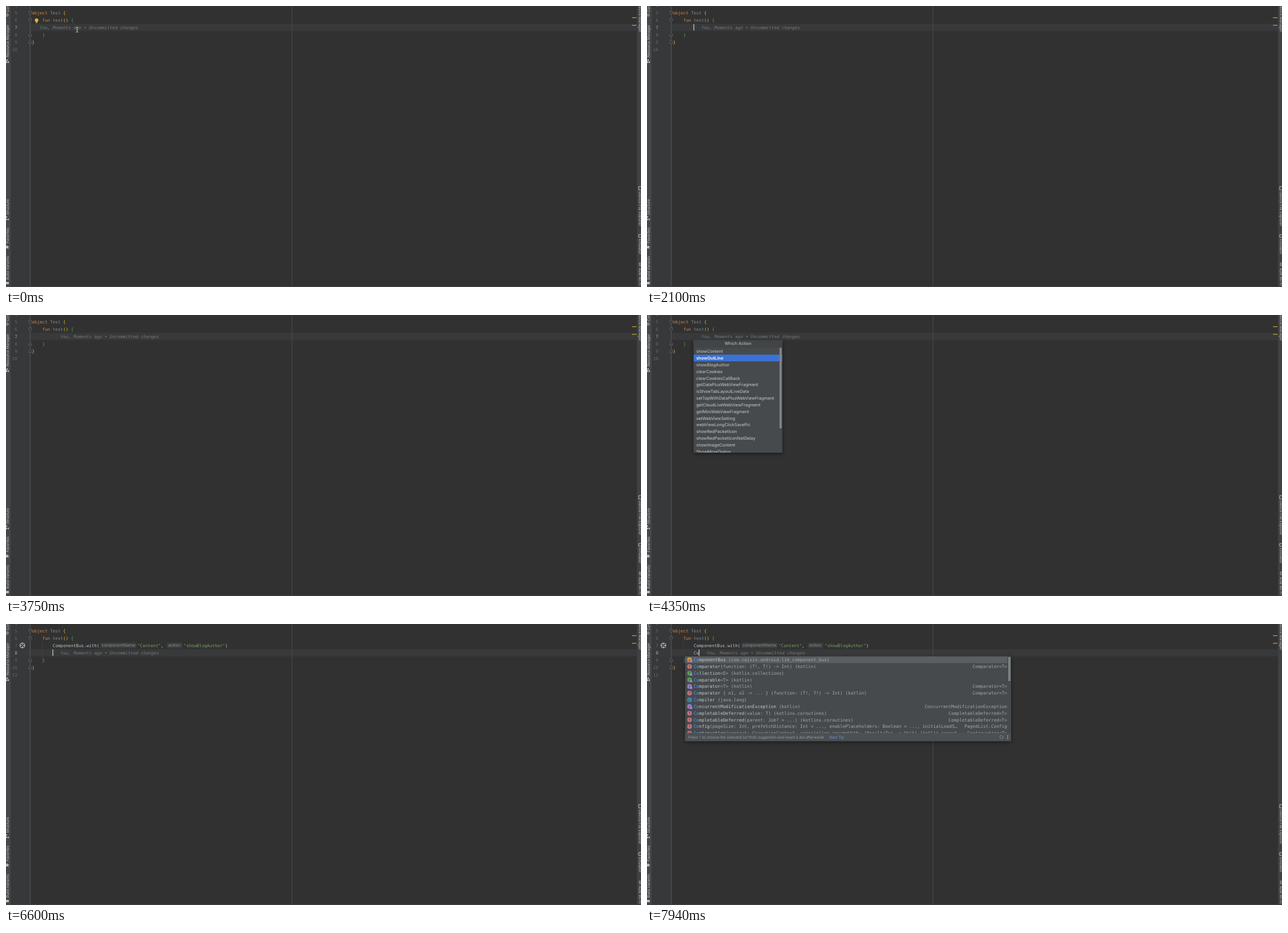
An HTML page for the animation above (8000 ms loop, 1125 px wide and 498 px high).

```html
<!DOCTYPE html>
<html lang="en">
<head>
<meta charset="utf-8">
<title>Editor completion</title>
<style>
html, body { margin: 0; width: 100%; height: 100%; overflow: hidden; background: #313131; }
svg { display: block; width: 100vw; height: 100vh; }
text { white-space: pre; text-rendering: geometricPrecision; }
.mono { font: 7.64px "DejaVu Sans Mono", monospace; }
.list { font: 7.84px "DejaVu Sans Mono", monospace; }
.ui { font: 7.55px Inter, sans-serif; }
.small { font: 6.49px Inter, sans-serif; }
.popup { filter: drop-shadow(0 2px 3px rgba(0, 0, 0, .45)); }
</style>
</head>
<body>
<svg id="stage" viewBox="0 0 1125 498" preserveAspectRatio="none"></svg>
<script>
const LOOP = 8000, CHAR = 4.6, LEFT = 46, ROW = 12.98, PITCH = 11.83;
const C = {
  text: '#bcc3cb', key: '#d28445', dim: '#85878a', str: '#78a160', yellow: '#e8ba36',
  green: '#54a857', panel: '#464a4c', ui: '#c9cbcc', note: '#787878', num: '#65686b'
};
const stage = document.getElementById('stage');
const timed = [];

function el(tag, attrs, parent = stage) {
  const node = document.createElementNS('http://www.w3.org/2000/svg', tag);
  for (const k in attrs) node.setAttribute(k, attrs[k]);
  return parent.appendChild(node);
}
const rect = (x, y, width, height, fill, parent, more) =>
  el('rect', { x, y, width, height, fill, ...more }, parent);
const path = (d, stroke, parent, more) =>
  el('path', { d, stroke, fill: 'none', 'stroke-width': 1, ...more }, parent);
function label(cls, x, y, str, fill, parent, more) {
  const t = el('text', { class: cls, x, y, fill, ...more }, parent);
  t.textContent = str;
  return t;
}
// parts alternate: text, colour, text, colour...
function rich(cls, x, y, parts, parent) {
  const t = el('text', { class: cls, x, y }, parent);
  for (let i = 0; i < parts.length; i += 2)
    el('tspan', { fill: parts[i + 1] }, t).textContent = parts[i];
}
function during(from, to, parent = stage) {
  const node = el('g', {}, parent);
  timed.push({ node, from, to });
  return node;
}
const base = n => 40.7 + (n - 7) * ROW;
const mid = n => 38 + (n - 7) * ROW;
const col = n => LEFT + n * CHAR;

// --- editor ground
rect(0, 0, 1125, 498, '#313131');
rect(8, 0, 35, 498, '#36383a');
const activeRow = rect(8, 31.5, 1110, 13, '#37393a');
rect(42.5, 0, 1, 498, '#5a5b5c');
rect(506.3, 0, 1, 498, '#4e4e4e');
rect(8, 496.8, 1110, 1.2, '#3f4244');
rect(0, 0, 8, 498, '#45484a');
rect(1118, 0, 7, 498, '#3f4244');

// --- tool window stripes
function side(x, y, angle, str) {
  label('small', 0, 0, str, '#bfc1c2', stage, { transform: `translate(${x} ${y}) rotate(${angle})` });
}
[['Commit', 11], ['Resource Manager', 91], ['Structure', 370.5], ['Favorites', 420.5], ['Build Variants', 485]]
  .forEach(([s, y]) => side(4.8, y, -90, s));
[['Device Manager', -4], ['Device File Explorer', 329], ['Emulator', 413], ['ADB Wi-Fi', 464]]
  .forEach(([s, y]) => side(1120.7, y, 90, s));
el('circle', { cx: 2, cy: 16, r: 2, fill: 'none', stroke: '#bfc1c2' });
el('path', { d: 'M2 94l2 3h-4zM0 98h2v3h-2zM3 98h2v3h-2z', fill: '#bfc1c2' });
el('path', { d: 'M0 373h2v2h-2zM0 377h2v2.500h-2zM3 377h2v2.500h-2z', fill: '#bfc1c2' });
el('path', { d: 'M2 423l1 3h3l-2.300 1.800 1 3-2.700-1.800-2.700 1.800 1-3-2.300-1.800h3z', fill: '#bfc1c2' });
el('path', { d: 'M0 489h5v4h-5z', fill: '#bfc1c2' });
path('M1121 320h5v6h-5z', '#bfc1c2');
path('M1121 405h5v5h-5z', '#bfc1c2');
path('M1121 456l4 4M1121 459l3 2M1122 455l4 2', '#bfc1c2');

// --- right-hand marks
rect(1109, 20, 8, 1.3, '#c2a126');
rect(1109, 33.6, 8, 1.3, '#c2a126');
rect(1109, 46.6, 8, 1.2, '#3f6a35', during(5250, 6450));

// --- line numbers
const number = (n, fill, parent) =>
  label('mono', 20, base(n), n, fill, parent, { 'text-anchor': 'end' });
[4, 5, 6, 9, 10].forEach(n => number(n, C.num));
number(7, '#a9abad', during(0, 6450));
number(8, C.num, during(0, 6450));
const added = during(6450, LOOP);
number(7, C.num, added);
number(8, '#a9abad', added);
number(11, C.num, added);
rect(64, 31.5, 1, 39, '#3d3e3f', added);

// --- fold handles
function fold(n, open, parent) {
  const y = mid(n), s = open ? 1 : -1;
  path(`M40.500 ${y - 2.5 * s}h5v${3.5 * s}l-2.500 ${2 * s}l-2.500 ${-2 * s}z`, '#66696b', parent,
    { fill: '#313131', 'stroke-width': .8 });
  path(`M42 ${y - .3 * s}h2`, '#66696b', parent, { 'stroke-width': .7 });
}
fold(5, true);
fold(6, true);

// --- code
rich('mono', LEFT, base(5), ['object ', C.key, 'Test ', C.dim, '{', C.yellow]);
rich('mono', col(4), base(6), ['fun ', C.key, 'test', C.dim, '()', C.yellow, ' {', C.green]);
function tail(n, parent) {
  fold(n, false, parent);
  fold(n + 1, false, parent);
  label('mono', col(4), base(n), '}', C.green, parent);
  label('mono', LEFT, base(n + 1), '}', C.yellow, parent);
}
tail(8, during(0, 6450));
tail(9, added);

rect(col(8), 32, 12 * CHAR, 12, '#344336', during(5250, 6600));
rich('mono', col(8), base(7), ['ComponentBus.with(', C.text], during(5250, LOOP));
rich('mono', col(26), base(7),
  ['"Content"', C.str, ', ', C.text, '"showBlogAuthor"', C.str, ')', C.text], during(5250, 5550));

const hinted = during(5550, LOOP);
function hint(x, w, str) {
  rect(x, 33, w, 10, '#3c3d3e', hinted, { rx: 2 });
  label('ui', x + 2.2, 40.4, str, '#8c8e90', hinted, { style: 'font-size:7.300px' });
}
hint(167, 64, 'componentName:');
hint(285, 27, 'action:');
rich('mono', 233, base(7), ['"Content"', C.str, ',', C.text], hinted);
rich('mono', 314.8, base(7), ['"showBlogAuthor"', C.str, ')', C.text], hinted);
el('circle', { cx: 29, cy: 38, r: 4.3, fill: 'none', stroke: '#c4c6c7', 'stroke-width': 1.1 }, hinted);
path('M29 34v2.600M29 39.400v2.600M25 38h2.600M30.400 38h2.600', '#c4c6c7', hinted, { 'stroke-width': 1.5 });

label('mono', col(8), base(8), 'C', C.text, during(7640, 7790));
label('mono', col(8), base(8), 'Co', C.text, during(7790, LOOP));

const note = label('mono', 0, 0, 'You, Moments ago • Uncommitted changes', C.note, stage,
  { style: 'font-style:italic' });
const caret = rect(0, 0, 1.2, 11.4, '#dcdcdc');

// --- bulb and text pointer
const idle = during(0, 450);
el('circle', { cx: 54.2, cy: 25.2, r: 3.1, fill: '#f2ac2b' }, idle);
rect(52.7, 28, 3, 1.1, '#e3a52e', idle);
rect(53, 29.6, 2.4, 1, '#a9abad', idle);
const beam = 'M123.500 37q2.500 0 2.500 1.500q0-1.500 2.500-1.500M126 38v7M123.500 46.500q2.500 0 2.500-1.500q0 1.500 2.500 1.500M124.800 42h2.400';
path(beam, '#1c1c1c', idle, { 'stroke-width': 2 });
path(beam, '#e4e4e4', idle, { 'stroke-width': .9 });

// --- chooser popups
function frame(x, y, w, h, parent) {
  const g = el('g', { class: 'popup' }, parent);
  rect(x, y, w, h, C.panel, g);
  return g;
}
function clip(id, x, y, width, height) {
  rect(x, y, width, height, '#000', el('clipPath', { id }));
  return `url(#${id})`;
}
function chooser(id, from, to, w, title, items, picks, thumb) {
  const root = during(from, to), x = 82.5;
  frame(x, 44.5, w, 199.5, root);
  rect(x, 44.5, w, 13.7, '#414547', root);
  label('ui', x + w / 2, 53.3, title, C.ui, root, { 'text-anchor': 'middle' });
  const body = el('g', { 'clip-path': clip(id, x, 58, w, 186) }, root);
  const line = (i, fill, parent, more) => label('ui', x + 4.7, 67.2 + i * PITCH, items[i], fill, parent, more);
  items.forEach((s, i) => line(i, C.ui, body));
  picks.forEach((t, i) => {
    const g = during(t, picks[i + 1] ?? to, body);
    rect(x, 58.4 + i * PITCH, w, PITCH, '#3d72d3', g);
    line(i, '#fff', g, { style: 'font-weight:600' });
  });
  rect(x + w - 5, 58, 3.8, thumb, '#818587', during(from, from + 1050, root), { rx: .5 });
}
frame(82.5, 44.5, 79.5, 199.5, during(2400, 2550));
chooser('components', 2550, 3750, 80, 'Which Component',
  ['Main', 'Content', 'Search', 'Login', 'Setting', 'Share', 'Download', 'Audio', 'Video', 'Topic',
    'Channel', 'Comment', 'Message', 'Pay', 'Usercenter', 'Weekly'], [2550, 3450], 60);
chooser('actions', 3900, 5250, 157.3, 'Which Action',
  ['showContent', 'showOutLine', 'showBlogAuthor', 'clearCookies', 'clearCookiesCallBack',
    'getDataPlusWebViewFragment', 'isShowTabLayoutLiveData', 'setTopWithDataPlusWebViewFragment',
    'getCloudLiveWebViewFragment', 'getMiniWebViewFragment', 'setWebViewSetting',
    'webViewLongClickSavePic', 'showRedPacketIcon', 'showRedPacketIconNotDelay',
    'showImageContent', 'ShowMoreDialog'], [3900, 4350, 4650], 143);
el('path', { d: 'M125.700 38.600v8.600l2-1.800 1.300 3 1.300-.600-1.300-2.800h2.600z', fill: '#111', stroke: '#eee',
  'stroke-width': .7 }, during(5100, 5250));

// --- completion popup
frame(67.5, 57.5, 314, 150, during(7640, 7790));
const done = during(7790, LOOP);
frame(67.5, 57.5, 577.5, 150, done);
rect(67.5, 57.5, 571, 11.8, '#5b5f62', done);
const rows = el('g', { 'clip-path': clip('rows', 67.5, 57.5, 577.5, 136) }, done);
const PINK = '#c27585', LEAF = '#5b9e55', VIOLET = '#9a7fc4', BLUE = '#3f93b5', AMBER = '#d09a4a';
// icon letter, icon colour, badge, name, rest, type
[
  ['o', AMBER, 1, 'ComponentBus', ' (com.caixin.android.lib_component_bus)', ''],
  ['f', PINK, 0, 'Comparator', '(function: (T!, T!) -> Int) (kotlin)', 'Comparator<T>'],
  ['I', LEAF, 1, 'Collection', '<E> (kotlin.collections)', ''],
  ['I', LEAF, 1, 'Comparable', '<T> (kotlin)', ''],
  ['I', VIOLET, 1, 'Comparator', '<T> (kotlin)', 'Comparator<T>'],
  ['f', PINK, 0, 'Comparator', ' { o1, o2 -> ... } (function: (T!, T!) -> Int) (kotlin)', 'Comparator<T>'],
  ['C', BLUE, 0, 'Compiler', ' (java.lang)', ''],
  ['I', VIOLET, 1, 'ConcurrentModificationException', ' (kotlin)', 'ConcurrentModificationException'],
  ['f', PINK, 0, 'CompletableDeferred', '(value: T) (kotlinx.coroutines)', 'CompletableDeferred<T>'],
  ['f', PINK, 0, 'CompletableDeferred', '(parent: Job? = ...) (kotlinx.coroutines)', 'CompletableDeferred<T>'],
  ['f', PINK, 0, 'Config', '(pageSize: Int, prefetchDistance: Int = ..., enablePlaceholders: Boolean = ..., initialLoadS…', 'PagedList.Config'],
  ['f', PINK, 0, 'Continuation', '(context: CoroutineContext, crossinline resumeWith: (Result<T>) -> Unit) (kotlin.corout…', 'Continuation<T>']
].forEach(([letter, fill, badge, name, rest, type], i) => {
  const y = 63.4 + i * PITCH;
  el('circle', { cx: 75.4, cy: y, r: 4.1, fill }, rows);
  label('small', 75.4, y + 2.3, letter, '#2f3133', rows, { 'text-anchor': 'middle' });
  if (badge) rect(76.6, y + .8, 3.6, 3.6, '#a77ddb', rows);
  rich('list', 82.8, y + 2.7, ['Co', '#589df6', name.slice(2), '#c6c8ca', rest, '#a5a8aa'], rows);
  label('list', 638, y + 2.7, type, '#a5a8aa', rows, { 'text-anchor': 'end' });
});
rect(67.5, 193.5, 577.5, 14, '#4c5053', done);
label('small', 73, 202.8, 'Press ^. to choose the selected (or first) suggestion and insert a dot afterwards', '#9a9d9f', done);
label('small', 323, 202.8, 'Next Tip', '#589df6', done);
[-2.5, 0, 2.5].forEach(d => el('circle', { cx: 639, cy: 200.5 + d, r: .8, fill: '#d0d2d3' }, done));
const spinner = el('circle', { cx: 628, cy: 200.5, r: 2.8, fill: 'none', stroke: '#909395',
  'stroke-width': 1.5, 'stroke-dasharray': '1.1 1.1' }, done);
rect(640, 58.5, 4, 42.5, '#7d8183', during(7940, LOOP, done));

// --- timeline: [time, x, line]; a null x hides the item
const carets = [[0, null], [150, LEFT, 7], [450, col(4), 7], [750, col(8), 7], [1650, null], [2100, col(8), 7],
  [2550, null], [5250, col(8), 7], [6300, null], [6450, col(8), 8], [7640, col(9), 8], [7790, col(10), 8]];
const notes = [[0, LEFT, 7], [450, col(4), 7], [750, col(8), 7], [5250, col(54), 7], [5550, 393.2, 7],
  [6450, col(8), 8], [7640, col(9), 8], [7790, col(10), 8]];
const pick = (list, t) => list.filter(s => s[0] <= t).pop();

function render(t) {
  for (const { node, from, to } of timed)
    node.setAttribute('display', t >= from && t < to ? 'inline' : 'none');
  const [, cx, cl] = pick(carets, t);
  caret.setAttribute('display', cx === null ? 'none' : 'inline');
  if (cx !== null) {
    caret.setAttribute('x', cx - .4);
    caret.setAttribute('y', mid(cl) - 5.9);
  }
  const [, nx, nl] = pick(notes, t);
  note.setAttribute('x', nx + 3 * CHAR);
  note.setAttribute('y', base(nl));
  activeRow.setAttribute('y', mid(nl) - 6.5);
  spinner.setAttribute('transform', `rotate(${t < 7940 ? 0 : 45} 628 200.5)`);
}
const start = performance.now();
function tick() {
  render((performance.now() - start) % LOOP);
  requestAnimationFrame(tick);
}
render(0);
requestAnimationFrame(tick);
</script>
</body>
</html>
```
